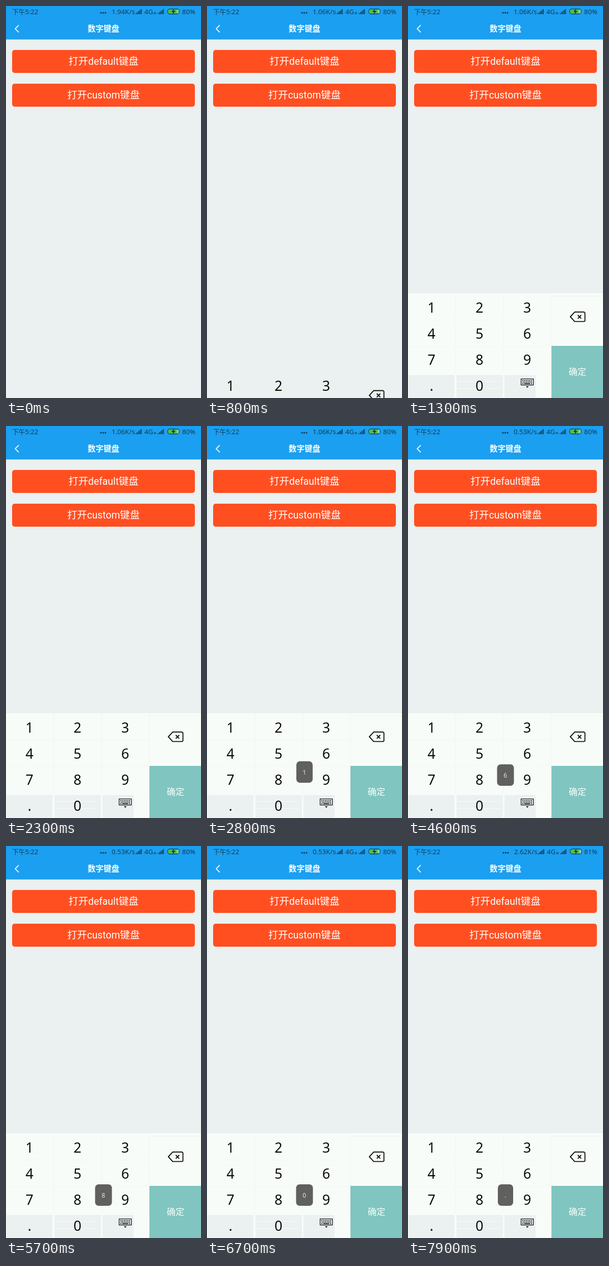
An HTML page with a canvas that plays this animation: 382 px wide and 767 px high, repeating every 8000 ms.

```html
<!DOCTYPE html>
<html lang="zh-CN">
<head>
<meta charset="utf-8">
<style>
  html, body { margin: 0; width: 100%; height: 100%; overflow: hidden; background: #ebf0f0; }
  canvas { display: block; width: 382px; height: 767px; }
</style>
</head>
<body>
<canvas id="stage" width="382" height="767"></canvas>
<script>
const ctx = document.getElementById('stage').getContext('2d');
const LOOP = 8000, STEP = 100;
const NOTO = '"Noto Sans", "Noto Sans CJK SC", sans-serif';
const ROBOTO = 'Roboto, "Noto Sans CJK SC", sans-serif';
const CJK = '"Noto Sans CJK SC", sans-serif';
const PAGE = '#ebf0f0', INK = '#143c58';

// [start time, value], in order of time
const SPEEDS = [[0, '1.94'], [400, '1.06'], [3000, '0.53'], [7800, '2.62']];
const TOASTS = [[2600, '1'], [3000, '2'], [3400, '3'], [3800, '4'], [4200, '5'], [4600, '6'],
  [5100, '7'], [5600, '8'], [6000, '9'], [6700, '0'], [7300, '.']];

const valueAt = (list, t) => list.reduce((found, [start, v]) => t >= start ? v : found, null);

function rect(x, y, w, h, color, radius = 0) {
  ctx.fillStyle = color;
  ctx.beginPath();
  ctx.roundRect(x, y, w, h, radius);
  ctx.fill();
}

function text(str, x, baseline, font, color, align = 'center') {
  ctx.font = font;
  ctx.fillStyle = color;
  ctx.textAlign = align;
  ctx.fillText(str, x, baseline);
}

function path(points, width, color, closed = false) {
  ctx.beginPath();
  points.forEach(([x, y]) => ctx.lineTo(x, y));
  if (closed) ctx.closePath();
  ctx.lineWidth = width;
  ctx.strokeStyle = color;
  ctx.lineJoin = 'round';
  ctx.stroke();
}

function fillPath(points, color) {
  ctx.beginPath();
  points.forEach(([x, y]) => ctx.lineTo(x, y));
  ctx.fillStyle = color;
  ctx.fill();
}

function signal(x) {
  for (let i = 0; i < 5; i++) {
    const h = 2 + i * 2;
    rect(x + i * 2.5, 16 - h, 1.7, h, INK);
  }
}

function battery(x) {
  rect(x + 0.6, 5.8, 22.8, 9.8, '#55bd45', 4.5);
  rect(x + 18.5, 7, 4, 7.4, '#8ed1b2', 2);
  ctx.beginPath();
  ctx.roundRect(x + 0.6, 5.8, 22.8, 9.8, 4.5);
  ctx.lineWidth = 1.2;
  ctx.strokeStyle = INK;
  ctx.stroke();
  fillPath([[x + 13, 5.5], [x + 8, 11.5], [x + 11.5, 11.5], [x + 10.5, 16], [x + 16, 9.7], [x + 12.4, 9.7]], '#12303f');
}

function statusBar(t) {
  const charged = t >= 6800, dx = charged ? 1 : 0;
  const font = '13.2px ' + NOTO;
  text('下午5:22', 12, 16, '12.8px ' + NOTO, INK, 'left');
  for (let i = 0; i < 3; i++) rect(184.4 + i * 4.4 + dx, 11.7, 3.2, 3.2, INK, 1.6);
  text(valueAt(SPEEDS, t) + 'K/s', 252.5 + dx, 16, font, INK, 'right');
  signal(254 + dx);
  text('4G', 271 + dx, 16, font, INK, 'left');
  rect(290 + dx, 12, 1.2, 4, INK);
  rect(292.4 + dx, 12, 1.2, 4, INK);
  signal(297.5 + dx);
  battery(316 + dx);
  text(charged ? '81%' : '80%', 371, 16, font, INK, 'right');
}

function header(t) {
  rect(0, 0, 382, 65.5, '#1b9ff0');
  statusBar(t);
  path([[25, 37.5], [18, 44.5], [25, 51.5]], 1.8, '#e8f6ff');
  text('数字键盘', 191, 50.3, 'bold 15.5px ' + CJK, '#fff');
}

function button(label, y) {
  rect(12, y, 358, 45, '#ff4f21', 5);
  text(label, 191, y + 29.2, '19.3px ' + ROBOTO, '#fff');
}

function backspace() {
  path([[318, 608], [326.5, 598.8], [345, 598.8], [346.6, 600.4], [346.6, 616], [345, 617.4], [326.5, 617.4]], 1.9, '#111', true);
  path([[332.6, 604.8], [339.4, 611.6]], 2, '#111');
  path([[339.4, 604.8], [332.6, 611.6]], 2, '#111');
}

function keyboardIcon() {
  ctx.lineWidth = 1.3;
  ctx.strokeStyle = '#111';
  ctx.strokeRect(221.6, 729.6, 24, 12);
  for (let i = 0; i < 6; i++) {
    rect(224 + i * 3.4, 732, 2, 1.8, '#111');
    rect(224.6 + i * 3.2, 735, 2, 1.8, '#111');
  }
  rect(224, 738, 2, 1.8, '#111');
  rect(227.5, 738, 12, 1.8, '#111');
  rect(241, 738, 2, 1.8, '#111');
  fillPath([[231, 744], [236.4, 744], [233.7, 747]], '#111');
}

function panel() {
  rect(0, 562, 382, 205, '#f8fcf9');
  [[1, 90], [95, 91], [189, 61]].forEach(([x, w]) => rect(x, 722, w, 44, PAGE));
  [[92, 734, 88], [92, 748, 88]].forEach(([x, y, w]) => rect(x, y, w, 1, '#f8fcf9'));
  [614, 665].forEach(y => rect(0, y, 280, 1, '#f2f6f3'));
  [93, 187, 280].forEach(x => rect(x, 562, 1, 160, '#f2f6f3'));
  rect(281, 567, 101, 1, '#f0f4f1');
  rect(281, 665, 101, 102, '#80c5bf');
  text('确定', 332, 722, '17.3px ' + CJK, '#f7fffc');
}

function keypad(t) {
  if (t < 700) return;
  const p = Math.min(1, (t - 700) / 200);
  ctx.save();
  ctx.translate(0, 205 * (1 - p * p));
  if (p === 1) panel();
  [...'123456789.0'].forEach((key, i) => {
    text(key, [46, 140, 233.5][i % 3], 599.5 + 51 * Math.floor(i / 3), '27px ' + NOTO, '#0b0b0b');
  });
  backspace();
  keyboardIcon();
  ctx.restore();
}

function toast(t) {
  const label = valueAt(TOASTS, t);
  if (label === null) return;
  // rises, overshoots by 6px at 200 ms and settles
  const s = (t - 2600) / 200;
  const lift = s < 1 ? 34 * (1 - s) ** 1.5 - 6 * s : -6 * Math.max(0, 1 - (s - 1) / 1.5);
  const width = { '1': 32, '.': 30 }[label] || 33;
  ctx.save();
  ctx.globalAlpha = Math.min(1, 0.35 + s * 0.65);
  ctx.translate(0, lift);
  rect(191 - width / 2, 662, width, 42, '#60615f', 7);
  text(label, 190.8, 688, '12px ' + NOTO, '#e6e6e6');
  ctx.restore();
}

function draw(now) {
  const t = Math.floor((now % LOOP) / STEP) * STEP;
  rect(0, 0, 382, 767, PAGE);
  header(t);
  button('打开default键盘', 86);
  button('打开custom键盘', 152);
  keypad(t);
  toast(t);
}

const begin = performance.now();
function tick() {
  draw(performance.now() - begin);
  requestAnimationFrame(tick);
}
tick();
</script>
</body>
</html>
```
